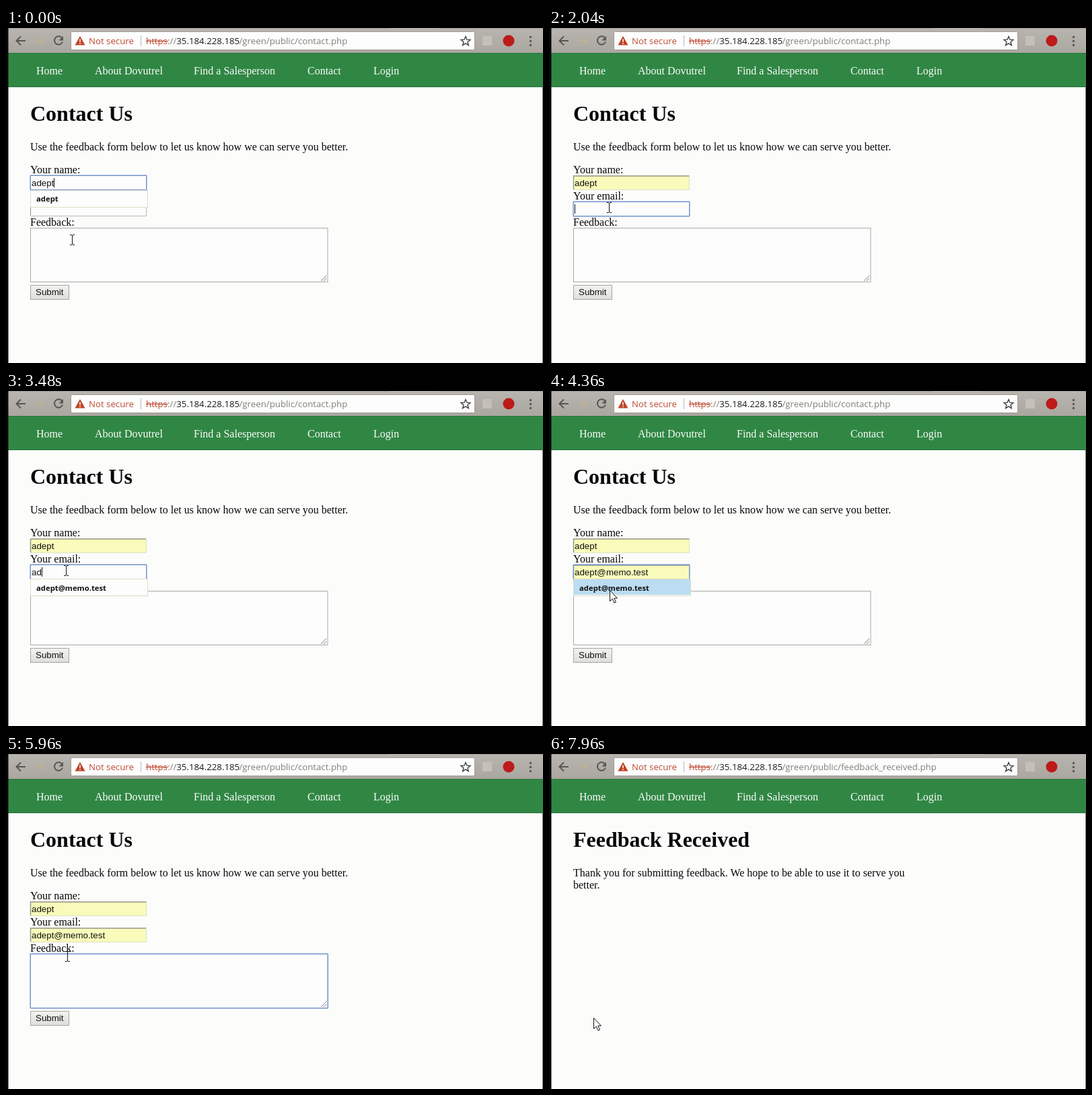
Animation, 798 px wide and 498 px high, one loop 8000 ms. Source, as an HTML page:

```html
<!DOCTYPE html>
<html lang="en">
<head>
<meta charset="utf-8">
<title>Contact form</title>
<style>
  html, body { margin: 0; width: 100%; height: 100%; overflow: hidden; background: #fcfcfb; }
  svg { display: block; width: 798px; height: 498px; }
  text { white-space: pre; }
  .page { font: 16px "Liberation Serif", "Times New Roman", serif; fill: #080808; }
  .page.nav { fill: #fbfbfb; }
  .title { font-size: 32px; font-weight: bold; }
  .field { font: 13.333px "Liberation Sans", Arial, sans-serif; fill: #111; }
  .url { font: 13.25px "Open Sans", "Noto Sans", sans-serif; fill: #808078; }
  .item { font: bold 11.3px "Open Sans", "Noto Sans", sans-serif; fill: #111; }
  .ring { fill: none; stroke: #7595cc; }
  .ring .glow { stroke: #b4c4e2; }
  .auto { fill: #f9fbba; }
  .hover { fill: #bbdcf1; }
  .caret { stroke: #111; }

  [class*="t-"], .pointer, .typing { animation: 8s step-end infinite; }
  .t-form      { animation-name: form; }
  .t-done      { animation-name: done; }
  .t-name-auto { animation-name: name-auto; }
  .t-name-ring { animation-name: name-ring; }
  .t-name-list { animation-name: name-list; }
  .t-name-car  { animation-name: name-car; }
  .t-mail-ring { animation-name: mail-ring; }
  .t-mail-car  { animation-name: mail-car; }
  .t-mail-a    { animation-name: mail-a; }
  .t-mail-ad   { animation-name: mail-ad; }
  .t-mail-auto { animation-name: mail-auto; }
  .t-mail-list { animation-name: mail-list; }
  .t-area-ring { animation-name: area-ring; }
  .t-area-car  { animation-name: area-car; }
  .t-beam      { animation-name: beam; }
  .t-arrow     { animation-name: arrow; }
  .typing      { animation-name: typing; }
  .pointer     { animation-name: travel; animation-timing-function: ease-in-out; }

  @keyframes form { 0% { opacity: 1 } 95.5%, 100% { opacity: 0 } }
  @keyframes done { 0% { opacity: 0 } 95.5%, 100% { opacity: 1 } }
  @keyframes name-auto { 0% { opacity: 0 } 8%, 100% { opacity: 1 } }
  @keyframes name-ring { 0% { opacity: 1 } 24.5%, 100% { opacity: 0 } }
  @keyframes name-list { 0% { opacity: 1 } 18%, 100% { opacity: 0 } }
  @keyframes name-car { 0% { opacity: 1 } 6%, 100% { opacity: 0 } }
  @keyframes mail-ring { 0% { opacity: 0 } 24.5% { opacity: 1 } 62.5%, 100% { opacity: 0 } }
  @keyframes mail-car {
    0%, 31%, 37%, 49%, 100% { opacity: 0 }
    24.5%, 34%, 39.5% { opacity: 1 }
  }
  @keyframes mail-a { 0% { opacity: 0 } 39.5% { opacity: 1 } 42%, 100% { opacity: 0 } }
  @keyframes mail-ad { 0% { opacity: 0 } 42% { opacity: 1 } 49%, 100% { opacity: 0 } }
  @keyframes mail-auto { 0% { opacity: 0 } 49%, 100% { opacity: 1 } }
  @keyframes mail-list { 0% { opacity: 0 } 39.5% { opacity: 1 } 58%, 100% { opacity: 0 } }
  @keyframes area-ring { 0% { opacity: 0 } 62.5% { opacity: 1 } 91%, 100% { opacity: 0 } }
  @keyframes area-car {
    0%, 68.5%, 74%, 81%, 87.5%, 100% { opacity: 0 }
    62.5%, 71.5%, 78%, 84.5% { opacity: 1 }
  }
  @keyframes beam {
    0%, 18%, 58% { opacity: 1 }
    8%, 49%, 81%, 100% { opacity: 0 }
  }
  @keyframes arrow {
    0%, 18%, 58% { opacity: 0 }
    8%, 49%, 81%, 100% { opacity: 1 }
  }
  @keyframes typing {
    0% { transform: translateX(0) }
    39.5% { transform: translateX(7.5px) }
    42%, 100% { transform: translateX(15px) }
  }
  @keyframes travel {
    0%, 3% { transform: translate(98px, 315px) }
    11%, 18% { transform: translate(92px, 246px) }
    23%, 44% { transform: translate(89px, 267px) }
    52%, 58% { transform: translate(90px, 296px) }
    61%, 76% { transform: translate(91px, 301px) }
    84%, 100% { transform: translate(66px, 392px) }
  }
</style>
</head>
<body>
<svg viewBox="0 0 798 498">
  <defs>
    <linearGradient id="bar" x2="0" y2="1">
      <stop offset="0" stop-color="#b8b5b0"/>
      <stop offset="1" stop-color="#aaa69f"/>
    </linearGradient>
    <linearGradient id="push" x2="0" y2="1">
      <stop offset="0" stop-color="#f3f3f1"/>
      <stop offset="1" stop-color="#dededc"/>
    </linearGradient>
    <g id="box">
      <rect x="36" y="219" width="173" height="22" fill="#fdfdfd"/>
      <path d="M36.5 240V219.5H208.5" fill="none" stroke="#8e8e8c"/>
      <path d="M37 240.5H208.5V220" fill="none" stroke="#b9b9b7"/>
    </g>
    <g id="filled">
      <rect class="auto" x="36" y="219" width="173" height="22"/>
      <path d="M36.5 240V220H208.5" fill="none" stroke="#96968c" stroke-width="1.5"/>
      <path d="M37 240.5H208.5V220" fill="none" stroke="#dfdfc4"/>
    </g>
    <g id="ring" class="ring">
      <rect class="glow" x="35.5" y="218.5" width="174" height="23" rx="1"/>
      <rect x="36.5" y="219.5" width="172" height="21"/>
    </g>
    <rect id="list" x="36.5" y="241.5" width="174" height="25" fill="#fdfdfd" stroke="#dcdcc8"/>
    <rect id="row" class="hover" x="37" y="242" width="173" height="23"/>
  </defs>

  <rect width="798" height="498" fill="#fcfcfb"/>
  <path d="M797.5 88V498" stroke="#77766f"/>

  <!-- browser bar -->
  <rect width="798" height="38" fill="url(#bar)"/>
  <path d="M0 .5H570M644 .5H798" stroke="#a29f97"/>
  <g fill="none" stroke="#575752" stroke-width="2">
    <path d="M29 19H16M22 12.5L15.5 19L22 25.5"/>
    <path d="M43 19H56M50 12.5L56.5 19L50 25.5" stroke="#bdb292"/>
    <path d="M82.8 14.3A6.2 6.2 0 1 0 84 20.5"/>
  </g>
  <path d="M85 12V18.5H78.5Z" fill="#575752"/>
  <rect x="96.5" y="5.5" width="600" height="27" rx="2" fill="#fdfdfd" stroke="#a09d96"/>
  <path d="M110 12L117.5 25.5H102.5Z" fill="#bd4425"/>
  <path d="M110 16.5V21M110 22.3V24" stroke="#fff" stroke-width="1.5"/>
  <g class="url">
    <text x="123" y="24" fill="#bd4a30">Not secure</text>
    <path d="M200.5 11V27" stroke="#b8b8b4"/>
    <text x="208" y="24" fill="#bd4a30">https</text>
    <path d="M208 19.5H241" stroke="#bd4a30"/>
    <text x="240" y="24">://<tspan fill="#1c1c1c">35.184.228.185</tspan></text>
    <text class="t-form" x="346.5" y="24">/green/public/contact.php</text>
    <text class="t-done" x="346.5" y="24">/green/public/feedback_received.php</text>
  </g>
  <path d="M683 12.5L684.9 17.2L689.9 17.5L686 20.7L687.3 25.6L683 22.9L678.7 25.6L680 20.7L676.1 17.5L681.1 17.2Z"
    fill="none" stroke="#42423f" stroke-width="1.4"/>
  <rect x="708" y="12" width="14" height="14" fill="#c4c0b8"/>
  <circle cx="747" cy="19" r="8.5" fill="#bd1a1a"/>
  <g fill="#575752">
    <circle cx="779.5" cy="13.5" r="1.7"/>
    <circle cx="779.5" cy="19.5" r="1.7"/>
    <circle cx="779.5" cy="25.5" r="1.7"/>
  </g>

  <!-- site header -->
  <rect y="37" width="798" height="51" fill="#308744"/>
  <path d="M0 37.5H798M0 87.5H798" stroke="#2a7440"/>
  <rect width="3.5" height="498" fill="#080808"/>
  <g class="page nav">
    <text x="45" y="69">Home</text>
    <text x="132" y="69">About Dovutrel</text>
    <text x="279" y="69">Find a Salesperson</text>
    <text x="448" y="69">Contact</text>
    <text x="546" y="69">Login</text>
  </g>

  <!-- contact form -->
  <g class="page t-form">
    <text class="title" x="36" y="138">Contact Us</text>
    <text x="36" y="182">Use the feedback form below to let us know how we can serve you better.</text>
    <text x="36" y="216">Your name:</text>
    <text x="36" y="255">Your email:</text>
    <text x="36" y="294">Feedback:</text>

    <use href="#box"/>
    <use href="#filled" class="t-name-auto"/>
    <use href="#ring" class="t-name-ring"/>
    <text class="field" x="38" y="235">adept</text>
    <path class="caret t-name-car" d="M71.5 223V237"/>

    <use href="#box" y="39"/>
    <use href="#filled" y="39" class="t-mail-auto"/>
    <use href="#ring" y="39" class="t-mail-ring"/>
    <g class="field">
      <text class="t-mail-a" x="38" y="274">a</text>
      <text class="t-mail-ad" x="38" y="274">ad</text>
      <text class="t-mail-auto" x="38" y="274">adept@memo.test</text>
    </g>
    <g class="typing"><path class="caret t-mail-car" d="M38.5 262V276"/></g>

    <rect x="36.5" y="297.5" width="441.5" height="80" fill="#fdfdfd" stroke="#a9a9a6"/>
    <path d="M468 376L476 368M472 376L476 372" stroke="#868684"/>
    <g class="ring t-area-ring">
      <rect class="glow" x="35.5" y="296.5" width="443.5" height="82" rx="1"/>
      <rect x="36.5" y="297.5" width="441.5" height="80"/>
    </g>
    <path class="caret t-area-car" d="M39.5 301V315"/>

    <rect x="36.5" y="382.5" width="57" height="21" fill="url(#push)" stroke="#a5a5a2"/>
    <text class="field" x="44" y="397">Submit</text>

    <g class="t-name-list">
      <use href="#list"/>
      <use href="#row" class="t-name-auto"/>
      <text class="item" x="45" y="258">adept</text>
    </g>
    <g class="t-mail-list">
      <use href="#list" y="38"/>
      <use href="#row" y="38" class="t-mail-auto"/>
      <text class="item" x="45" y="297">adept@memo.test</text>
    </g>
  </g>

  <!-- confirmation -->
  <g class="page t-done">
    <text class="title" x="36" y="138">Feedback Received</text>
    <text x="36" y="182">Thank you for submitting feedback. We hope to be able to use it to serve you</text>
    <text x="36" y="200">better.</text>
  </g>

  <g class="pointer">
    <path class="t-beam" d="M-3 -7.5H-1L.5 -6.5L2 -7.5H4M.5 -6.5V6.5M-3 7.5H-1L.5 6.5L2 7.5H4" fill="none" stroke="#111"/>
    <path class="t-arrow" d="M.5 .5V16.5L4.3 13L7 19L9.5 18L6.8 12H11.5Z" fill="#fdfdfd" stroke="#111"/>
  </g>
</svg>
</body>
</html>
```
